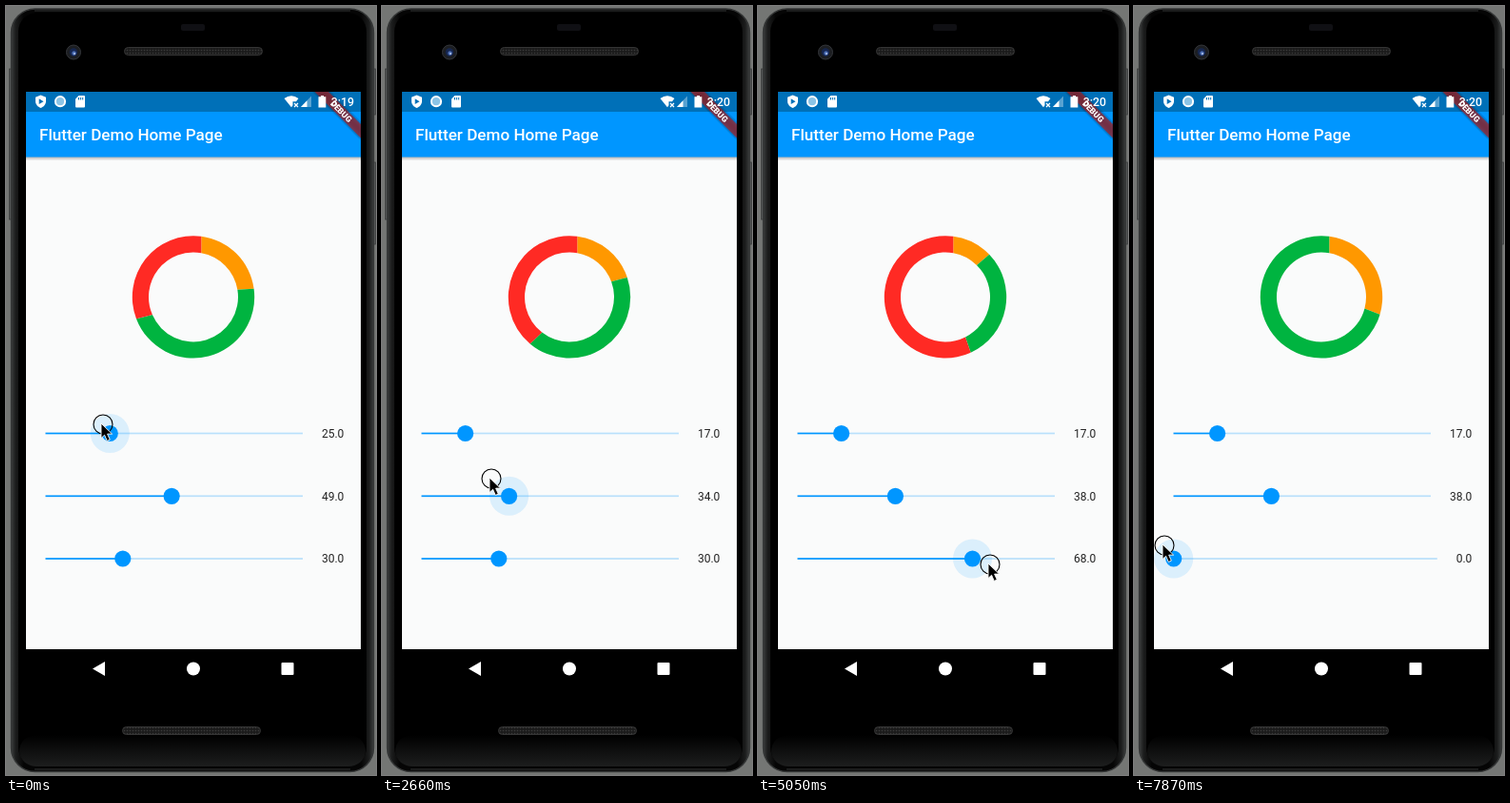
Recreate the animation shown at these times as an HTML page. Size 389 by 807 pixels, loop 8000 ms.

```html
<!DOCTYPE html>
<html lang="en">
<head>
<meta charset="utf-8">
<title>Donut chart sliders</title>
<style>
  html, body { margin: 0; width: 100%; height: 100%; overflow: hidden; background: #747674; }
  svg { display: block; width: 100%; height: 100%; }
  text { font-family: Roboto, sans-serif; }
</style>
</head>
<body>
<svg id="stage" viewBox="0 0 389 807">
  <defs>
    <linearGradient id="edge" x1="0" x2="1" y1="0" y2="0">
      <stop offset="0" stop-color="#3c3e3e"/>
      <stop offset=".012" stop-color="#1c1d1d"/>
      <stop offset=".035" stop-color="#050505"/>
      <stop offset=".965" stop-color="#050505"/>
      <stop offset=".988" stop-color="#1c1d1d"/>
      <stop offset="1" stop-color="#3c3e3e"/>
    </linearGradient>
    <linearGradient id="chin" x1="0" x2="0" y1="0" y2="1">
      <stop offset="0" stop-color="#000"/>
      <stop offset="1" stop-color="#1d1e1e"/>
    </linearGradient>
    <linearGradient id="shade" x1="0" x2="0" y1="0" y2="1">
      <stop offset="0" stop-color="#000" stop-opacity=".3"/>
      <stop offset="1" stop-color="#000" stop-opacity="0"/>
    </linearGradient>
    <pattern id="mesh" width="3" height="3" patternUnits="userSpaceOnUse">
      <rect width="3" height="3" fill="#1b1b1b"/>
      <circle cx="1.5" cy="1.5" r=".8" fill="#3a3a3a"/>
    </pattern>
    <filter id="blur"><feGaussianBlur stdDeviation="2"/></filter>
    <clipPath id="screen"><rect x="21" y="90" width="352" height="585"/></clipPath>
  </defs>

  <rect width="389" height="807" fill="#747674"/>
  <g fill="#5b5d5d" stroke="#393b3b" stroke-width=".8">
    <rect x="3.5" y="66" width="3" height="158"/>
    <rect x="386" y="66" width="2.5" height="48"/>
    <rect x="386" y="164" width="2.5" height="86"/>
  </g>
  <rect x="5.5" y="3" width="381" height="800.5" rx="25" fill="url(#edge)" stroke="#343636" stroke-width="1.4"/>
  <rect x="13" y="7" width="366" height="791" rx="20" fill="#000"/>
  <rect x="14" y="765" width="364" height="33" rx="18" fill="url(#chin)"/>
  <path d="M30 5H362M30 801H362" stroke="#303232"/>
  <rect x="184" y="19" width="25" height="7" rx="2" fill="#101014"/>
  <g fill="url(#mesh)" stroke="#353535">
    <rect x="124.5" y="43.5" width="145" height="8" rx="4"/>
    <rect x="122.5" y="756.5" width="145" height="8" rx="4"/>
  </g>
  <circle cx="71" cy="48.5" r="7.5" fill="#1c1e22" stroke="#34363a"/>
  <circle cx="71" cy="48.5" r="4.2" fill="#16264f"/>
  <circle cx="71.5" cy="49.5" r="2.2" fill="#4a6db5"/>
  <circle cx="72" cy="50" r="1" fill="#b9c9ee"/>

  <g clip-path="url(#screen)">
    <rect x="21" y="90" width="352" height="585" fill="#fafbfb"/>
    <rect x="21" y="158" width="352" height="4.5" fill="url(#shade)"/>
    <rect x="21" y="111" width="352" height="47.5" fill="#0096ff"/>
    <rect x="21" y="90" width="352" height="21" fill="#0070b8"/>
    <text x="35" y="141" font-size="17.12" font-weight="500" fill="#fff">Flutter Demo Home Page</text>
    <g transform="translate(373 90) rotate(45)">
      <rect x="-36" y="24" width="72" height="10.3" fill="#000" opacity=".45" filter="url(#blur)"/>
      <rect x="-36" y="24" width="72" height="10.3" fill="#b71c1c" fill-opacity=".63"/>
      <text y="32.2" font-size="8.7" font-weight="900" text-anchor="middle" fill="#fff">DEBUG</text>
    </g>
    <g fill="#fff">
      <path d="M36.5 93.5l5.5 2.2v4.2c0 3.3-2.4 5.8-5.5 7-3.1-1.2-5.5-3.7-5.5-7v-4.2z"/>
      <path d="M34.7 97.3l4.8 2.9-4.8 2.9z" fill="#0070b8"/>
      <circle cx="57" cy="100.2" r="5.1" fill="#8cc4e6" stroke="#fff" stroke-width="2"/>
      <path d="M76.5 94h5.5q1 0 1 1v10.500q0 1-1 1h-8q-1 0-1-1v-8z"/>
      <path d="M76.500 96v2.500M78.600 96v2.500M80.700 96v2.500" stroke="#0070b8"/>
      <path d="M292.500 97q7.500-5.500 15 0l-2.500 3.200h-3.500v4l-1.500 2z"/>
      <path d="M303 102l4 4m0-4l-4 4" stroke="#fff" stroke-width="1.300"/>
      <path d="M310 106l11-11.500v11.500z" opacity=".35"/>
      <path d="M310 106l6.500-6.800v6.800z"/>
      <path d="M331 94h3v1.300h2.300v11.200h-7.800v-11.200h2.500z"/>
    </g>
    <text id="clock" x="366" y="104.700" font-size="12.300" font-weight="500" text-anchor="end" fill="#fff"></text>
    <path id="orange" fill="#ff9800"/>
    <path id="green" fill="#00b440"/>
    <path id="red" fill="#ff2a24"/>
    <g id="sliders"></g>
  </g>

  <g fill="#fff">
    <path d="M91 695.500l13-7.500v15z"/>
    <circle cx="197" cy="695.500" r="7"/>
    <rect x="289.500" y="689" width="13" height="13" rx="1"/>
  </g>

  <g id="pointer">
    <circle r="10" fill="none" stroke="#000" stroke-width="1.100"/>
    <path d="M-2-1v15.500l3.600-3.300 2.700 6.200 3-1.300-2.700-6h5z" fill="#000" stroke="#fff" stroke-width=".9"/>
  </g>
</svg>
<script>
const LOOP = 8000, STEP = 148.5;
const $ = id => document.getElementById(id);
const set = (el, attrs) => {
  for (const name in attrs) el.setAttribute(name, attrs[name]);
  return el;
};
const add = (parent, tag, attrs) =>
  parent.appendChild(set(document.createElementNS('http://www.w3.org/2000/svg', tag), attrs));

// Keys are [step, value, ...], with straight motion in between.
const valueKeys = [
  [[0, 25], [2, 18], [3, 17]],
  [[9, 49], [10, 55], [12, 78], [14, 100], [16, 47], [18, 34], [19, 20], [20, 20],
   [23, 92], [24, 85], [26, 41], [27, 38]],
  [[29, 30], [31, 31], [32, 36], [34, 68], [36, 98], [37, 88], [39, 31], [40, 14], [41, 12],
   [42, 22], [46, 100], [48, 100], [49, 94], [52, 17], [53, 0]]
];
const pointerKeys = [
  [0, 102, 439], [2, 82, 444], [3, 80, 446], [8, 172, 510], [9, 176, 512], [12, 270, 518],
  [14, 344, 523], [16, 160, 508], [18, 115, 496], [19, 84, 494], [20, 96, 495],
  [23, 344, 512], [26, 150, 508], [27, 144, 516], [29, 127, 588], [31, 127, 589],
  [32, 142, 589], [34, 244, 586], [36, 325, 584], [39, 110, 571], [40, 78, 568],
  [41, 82, 566], [46, 356, 570], [48, 360, 572], [53, 32, 566]
];
const pressed = [[0, 3], [9, 26], [30, 53]];

function at(keys, k) {
  const next = keys.findIndex(key => key[0] >= k);
  if (next < 0) return keys[keys.length - 1].slice(1);
  if (next === 0) return keys[0].slice(1);
  const a = keys[next - 1], b = keys[next], p = (k - a[0]) / (b[0] - a[0]);
  return a.slice(1).map((v, i) => v + (b[i + 1] - v) * p);
}

const sliders = [448.5, 514.3, 580].map(y => {
  const g = add($('sliders'), 'g', { transform: `translate(0 ${y})` });
  return {
    rest: add(g, 'rect', { y: -.85, height: 1.7, fill: '#b9e0fb' }),
    fill: add(g, 'rect', { x: 41.5, y: -.85, height: 1.7, fill: '#0096ff' }),
    halo: add(g, 'circle', { fill: '#0096ff', 'fill-opacity': .125 }),
    thumb: add(g, 'circle', { r: 8.6, fill: '#0096ff' }),
    label: add(g, 'text', { x: 355.3, y: 4.2, 'font-size': 12, 'text-anchor': 'end', fill: '#222' })
  };
});

function drawSlider(s, value, halo) {
  const text = value.toFixed(1);
  const end = 312 - (text.length - 4) * 6.8;
  const x = 41.7 + (end - 41.7) * value / 100;
  set(s.rest, { x, width: end - x });
  set(s.fill, { width: x - 41.5 });
  set(s.halo, { cx: x, r: halo });
  set(s.thumb, { cx: x });
  s.label.textContent = text;
}

// Each edge runs parallel to its radius, set back by a cap width.
const OUTER = 64.2, INNER = 47;
function corner(edge, r) {
  const a = edge.angle * Math.PI / 180 - Math.asin(edge.back / r);
  return { a, xy: `${197 + r * Math.sin(a)} ${305.4 - r * Math.cos(a)}` };
}
function segment(from, to) {
  const a = corner(from, OUTER), b = corner(to, OUTER);
  const c = corner(to, INNER), d = corner(from, INNER);
  const large = b.a - a.a > Math.PI ? 1 : 0, largeIn = c.a - d.a > Math.PI ? 1 : 0;
  return `M${a.xy}A${OUTER} ${OUTER} 0 ${large} 1 ${b.xy}L${c.xy}A${INNER} ${INNER} 0 ${largeIn} 0 ${d.xy}Z`;
}
function drawDonut([a, b, c]) {
  const total = a + b + c;
  const edge = share => ({ angle: share / total * 360, back: 3.4 + 6.2 * share / total });
  const first = { angle: 0, back: -8.3 }, last = { angle: 360, back: -8.3 };
  const one = edge(a), two = c ? edge(a + b) : last;
  set($('orange'), { d: segment(first, one) });
  set($('green'), { d: segment(one, two) });
  set($('red'), { d: c ? segment(two, last) : '' });
}

function draw(time) {
  const k = Math.min(53, Math.floor((time % LOOP + 16) / STEP));
  const values = valueKeys.map(keys => Math.round(at(keys, k)[0]));
  values.forEach((v, i) => {
    const [from, to] = pressed[i];
    drawSlider(sliders[i], v, k >= from && k <= to ? 20.5 : 0);
  });
  drawDonut(values);
  const [x, y] = at(pointerKeys, k);
  set($('pointer'), { transform: `translate(${x} ${y})` });
  $('clock').textContent = k < 4 ? '3:19' : '3:20';
}

const start = performance.now();
function tick() {
  draw(performance.now() - start);
  requestAnimationFrame(tick);
}
tick();
</script>
</body>
</html>
```
